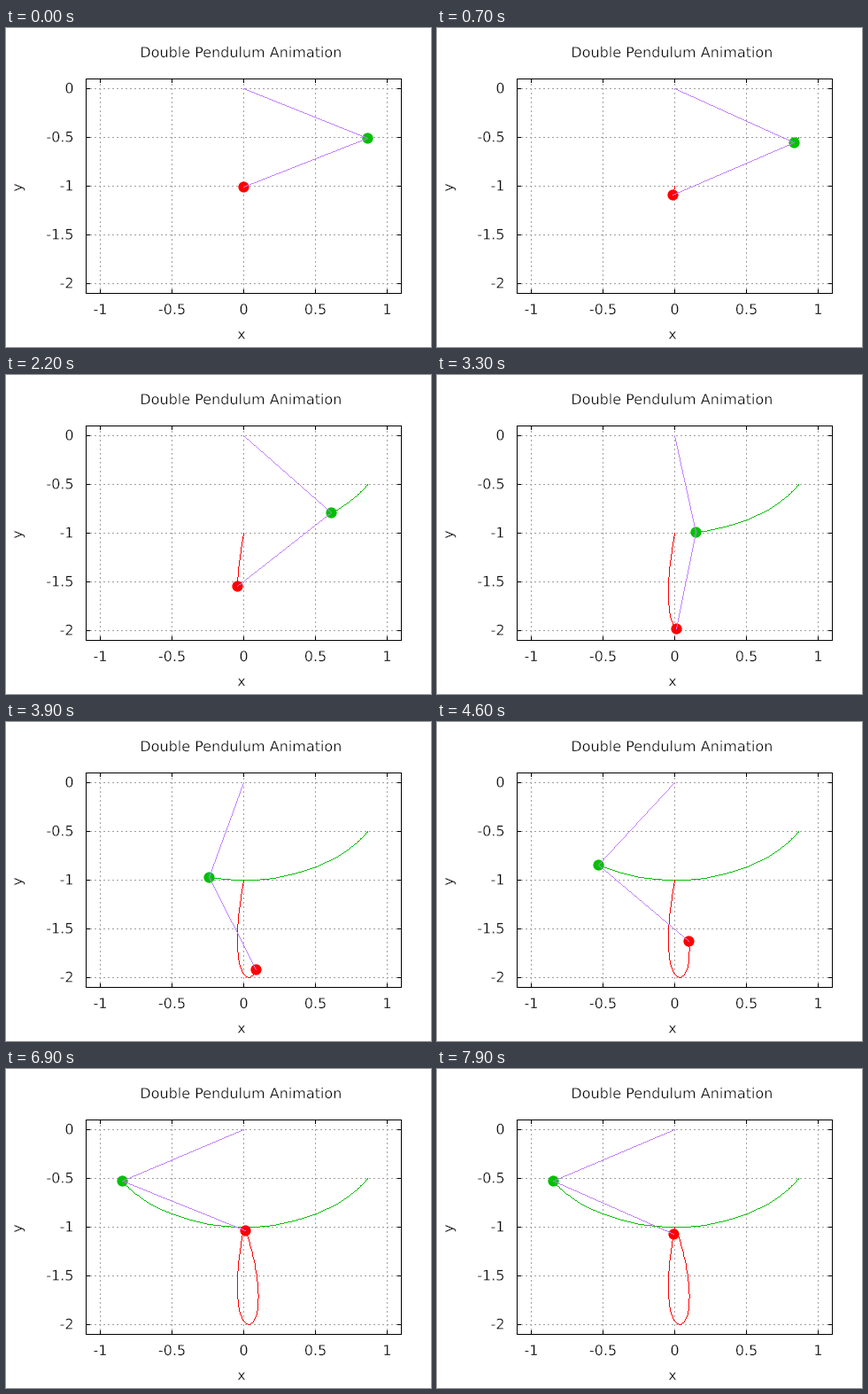
Recreate the animation shown at these times as a matplotlib script. Size 480 px wide and 360 px high, loop 8000 ms.

```python
import numpy as np
import matplotlib.pyplot as plt
from matplotlib.animation import FuncAnimation
from matplotlib.collections import PolyCollection
from matplotlib.patches import Circle
from matplotlib.patheffects import Stroke

W, H, DPI = 480, 360, 80
PX = 72 / DPI                      # one pixel in points
FRAMES, LEAD = 80, 3               # steps already run before the loop starts
STEP, SUB = 0.0409, 20             # scaled time per frame (g = l = 1)
DAMP = 0.0125
LEFT, RIGHT, TOP, BOTTOM = 90, 446, 57, 299
SQUARE = np.array([[0, 0], [1, 0], [1, 1], [0, 1]])


def sx(x):
    return np.rint(LEFT + (np.asarray(x) + 1.1) * (RIGHT - LEFT) / 2.2)


def sy(y):
    return np.rint(TOP + (0.1 - np.asarray(y)) * (BOTTOM - TOP) / 2.2)


def deriv(s):
    """Double pendulum with equal masses and equal rods."""
    a, b, wa, wb = s
    c, d = np.cos(a - b), np.sin(a - b)
    p = -np.sin(a) - 0.5 * wb**2 * d
    q = -np.sin(b) + wa**2 * d
    acc = (p - 0.5 * c * q) / (1 - 0.5 * c * c)
    return np.array([wa, wb, acc - DAMP * wa, q - c * acc - DAMP * wb])


def rk4(s, h):
    k1 = deriv(s)
    k2 = deriv(s + h / 2 * k1)
    k3 = deriv(s + h / 2 * k2)
    k4 = deriv(s + h * k3)
    return s + h / 6 * (k1 + 2 * k2 + 2 * k3 + k4)


def solve(n):
    s = np.array([np.pi / 3, -np.pi / 3, 0, 0])
    out = [s]
    for _ in range(n - 1):
        for _ in range(SUB):
            s = rk4(s, STEP / SUB)
        out.append(s)
    return np.array(out).T


def segment(p, q):
    """Pixels of a one-pixel line from p to q."""
    n = int(max(abs(q - p)))
    t = np.linspace(0, 1, n + 1)[:, None]
    return np.floor(p + (q - p) * t + 0.5)


def pixels(points):
    """Unit squares along a polyline, without antialiased edges."""
    pts = np.array(points, float)
    cells = [pts[:1]] + [segment(p, q) for p, q in zip(pts, pts[1:])]
    return np.concatenate(cells)[:, None, :] + SQUARE


a, b, _, _ = solve(FRAMES + LEAD)
x1, y1 = np.sin(a), -np.cos(a)
x2, y2 = x1 + np.sin(b), y1 - np.cos(b)
GREEN_PATH = np.column_stack([sx(x1), sy(y1)])
RED_PATH = np.column_stack([sx(x2), sy(y2)])
PIVOT = np.array([sx(0), sy(0)])

plt.rcParams["font.family"] = "DejaVu Sans"
fig = plt.figure(figsize=(W / DPI, H / DPI), dpi=DPI, facecolor="white")
ax = fig.add_axes([0, 0, 1, 1])
ax.set(xlim=(0, W), ylim=(H, 0))
ax.axis("off")


def layer(color, z, squares=()):
    return ax.add_collection(PolyCollection(squares, facecolors=color, linewidths=0,
                                            zorder=z), autolim=False)


def line(p, q, color="black", z=2):
    layer(color, z, pixels([p, q]))


def grid(p, q):
    cells = pixels([p, q])[1:]
    layer("#a0a0a0", 1, cells[np.arange(len(cells)) % 5 < 2])


def label(x, y, s, ha="center", **kw):
    # a thin white rim makes the letters lighter
    ax.text(x, y, s, fontsize=16 * PX, ha=ha, va="baseline",
            path_effects=[Stroke(linewidth=0.4 * PX, foreground="white")], **kw)


for v in (-1, -0.5, 0, 0.5, 1):
    x = sx(v)
    grid((x, BOTTOM), (x, TOP))
    line((x, BOTTOM), (x, BOTTOM - 4))
    line((x, TOP), (x, TOP + 4))
    label(x + 0.5, 323, f"{v:g}")
for v in (0, -0.5, -1, -1.5, -2):
    y = sy(v)
    grid((LEFT, y), (RIGHT, y))
    line((LEFT, y), (LEFT + 4, y))
    line((RIGHT, y), (RIGHT - 4, y))
    label(76.5, y + 5.5, f"{v:g}", "right")
layer("black", 6, pixels([(LEFT, TOP), (RIGHT, TOP), (RIGHT, BOTTOM),
                          (LEFT, BOTTOM), (LEFT, TOP)]))
label(266, 33, "Double Pendulum Animation")
label(266, 351, "x")
label(18, 180, "y", rotation=90, rotation_mode="anchor")

GREEN, RED = "#00c000", "#ff0000"
green_trail, red_trail = layer(GREEN, 3), layer(RED, 3)
rods = layer("#c080ff", 5)
balls = [ax.add_patch(Circle((0, 0), 6.1, color=c, lw=0, zorder=4))
         for c in (GREEN, RED)]


def draw(i):
    k = i + LEAD
    green, red = GREEN_PATH[k], RED_PATH[k]
    green_trail.set_verts(pixels(GREEN_PATH[:k + 1]))
    red_trail.set_verts(pixels(RED_PATH[:k + 1]))
    rods.set_verts(pixels([PIVOT, green, red]))
    balls[0].center = green + 0.5
    balls[1].center = red + 0.5
    return green_trail, red_trail, rods, *balls


anim = FuncAnimation(fig, draw, frames=FRAMES, interval=100, repeat=True,
                     repeat_delay=0, blit=False)
plt.show()
```
